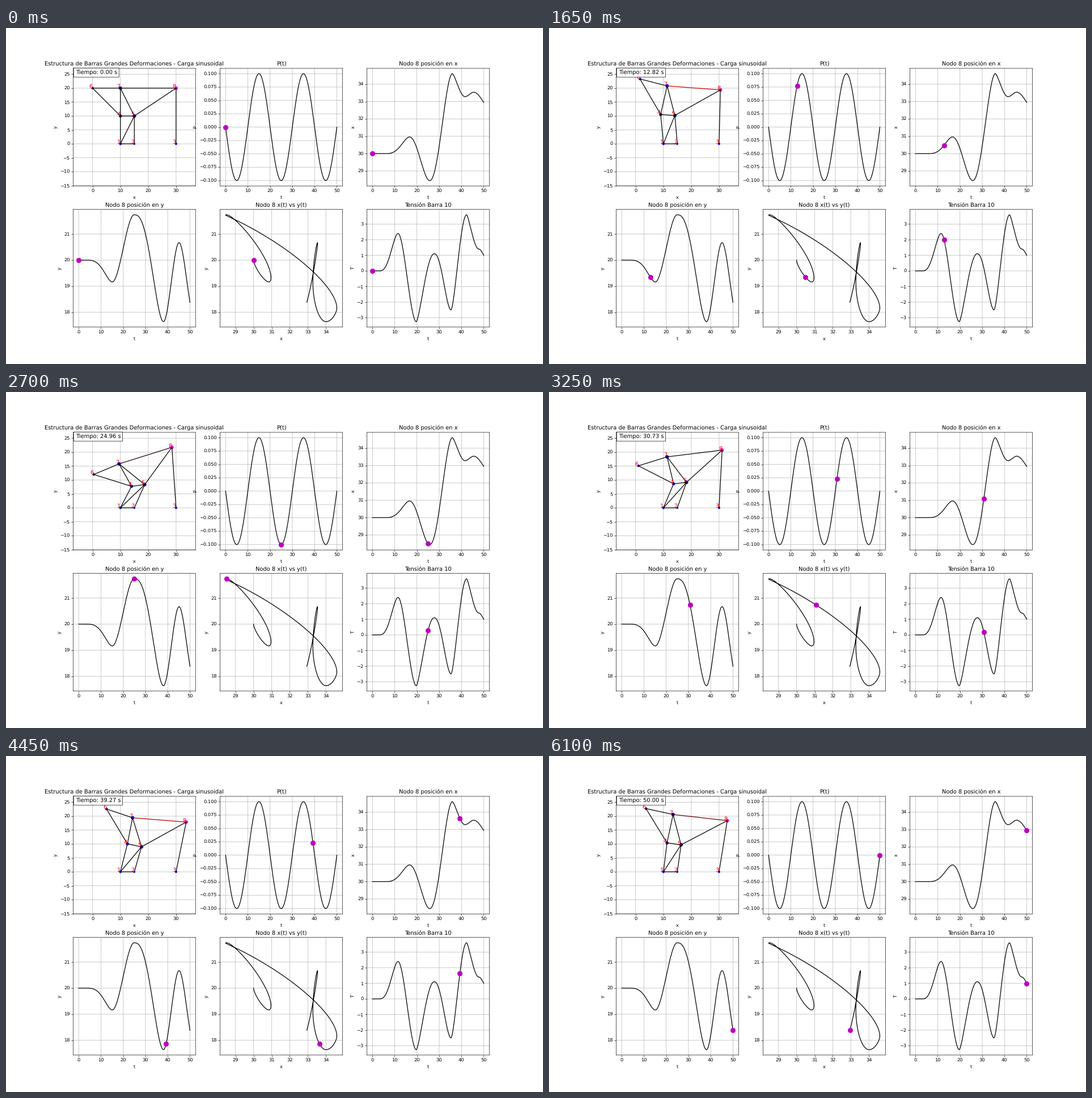
A matplotlib script for the animation above (6.15 s loop, 947x592 px).

```python
import numpy as np
import matplotlib.pyplot as plt
from matplotlib.animation import FuncAnimation

plt.rcParams.update({"text.hinting": "none", "path.snap": False})

DPI = 947 / 16
FRAMES, HOLD, STEP_MS = 123, 2, 50


def swing(*keys):
    """Ease between turning points (t, value[, lean]).

    lean > 1 delays the middle of the span that starts there, < 1 advances it.
    """
    t0, v, lean = np.array([(*k, 1)[:3] for k in keys], float).T

    def at(t):
        i = np.clip(np.searchsorted(t0, t, "right") - 1, 0, len(t0) - 2)
        s = np.clip((t - t0[i]) / (t0[i + 1] - t0[i]), 0, 1) ** lean[i]
        return v[i] + (v[i + 1] - v[i]) * s * s * (3 - 2 * s)
    return at


def clock(step):
    # The solver advances faster in the middle of the run
    return float(np.interp(step, [0, 13, 31, 52, 66, 73, 87, 107, 120],
                           [0, 3, 12.82, 24.96, 32.3, 35.04, 39.27, 45.76, 50]))


def load(t):
    return -0.1 * np.sin(2 * np.pi * t / 20)


x8 = swing((5, 30, 1.76), (16.6, 30.96, 1.1), (25.7, 28.45, 1.12),
           (35.9, 34.606, 0.8), (41.6, 33.28), (45.5, 33.54), (55, 32.25))
y8 = swing((3, 20, 1.78), (15.1, 19.163), (24.9, 21.737, 1.38),
           (38.1, 17.641), (45.1, 20.67), (52, 17.8))
tension = swing((3, 0, 1.45), (11.5, 2.4), (19.7, -3.255, 0.78),
                (27.7, 1.1, 1.2), (35.3, -2.5, 0.84), (42.3, 3.596, 0.77),
                (47.8, 1.4), (52, 0.65))

x4 = swing((3, 10), (13.3, 9), (26.3, 14.15), (38.5, 12.5), (44, 12.85), (52, 11))
y4 = swing((4, 10), (13, 10.55), (26.3, 7.65), (36, 9.9), (46, 10.4))
x5 = swing((4, 15), (13, 14.1), (26.5, 18.9), (36, 17.4), (44, 17.9), (54, 15.5))
y5 = swing((4, 10), (13, 10.2), (26.3, 8.28), (34.5, 9.82), (39.5, 8.98), (47, 9.7))
y7 = swing((3, 20), (12.8, 20.8), (26, 15.7), (35, 20.55), (40, 19.35), (46, 20.6))
angle6 = swing((2, 135), (12.5, 120, 0.85), (25.8, 163), (42, 117.5), (52, 122))

BARS = [(1, 2), (1, 4), (1, 5), (2, 5), (4, 5), (4, 6), (4, 7), (5, 7), (6, 7),
        (7, 8), (5, 8), (3, 8)]
LOADED = BARS.index((7, 8))
STIFFNESS, FULL_COLOR = 2.5, 2.4


def nodes(t):
    force = tension(t)
    # Node 7 hangs on node 8 by a bar that shortens with the force
    x7 = x8(t) - np.sqrt((20 - force / STIFFNESS) ** 2 - (y8(t) - y7(t)) ** 2)
    # Node 6 swings about node 4 on a bar that lengthens with it
    arm, a = np.sqrt(200) + 0.3 * force, np.radians(angle6(t))
    p4 = np.array([x4(t), y4(t)])
    p6 = p4 + arm * np.array([np.cos(a), np.sin(a)])
    return np.array([(10, 0), (15, 0), (30, 0), p4, (x5(t), y5(t)), p6,
                     (x7, y7(t)), (x8(t), y8(t))], float)


def bar_color(force):
    level = min(abs(force) / FULL_COLOR, 1)
    return (level, 0, 0) if force > 0 else (0, level, 0)


def padded(lo, hi):
    pad = 0.05 * (hi - lo)
    return lo - pad, hi + pad


def same(t):
    return t


fig, axes = plt.subplots(2, 3, figsize=(947 / DPI, 592 / DPI), dpi=DPI)
axes = axes.ravel()

T_RANGE, X_RANGE, Y_RANGE = (0, 50), (28.45, 34.606), (17.641, 21.737)
ts = np.linspace(*T_RANGE, 1001)
plots = [
    ("P(t)", "t", "P", same, load, T_RANGE, (-0.1, 0.1)),
    ("Nodo 8 posición en x", "t", "x", same, x8, T_RANGE, X_RANGE),
    ("Nodo 8 posición en y", "t", "y", same, y8, T_RANGE, Y_RANGE),
    ("Nodo 8 x(t) vs y(t)", "x", "y", x8, y8, X_RANGE, Y_RANGE),
    ("Tensión Barra 10", "t", "T", same, tension, T_RANGE, (-3.255, 3.596)),
]
markers = []
for ax, (title, xlabel, ylabel, fx, fy, xr, yr) in zip(axes[1:], plots):
    ax.plot(fx(ts), fy(ts), "k-")
    dot, = ax.plot([], [], "mo", markersize=10)
    markers.append((dot, fx, fy))
    ax.set(title=title, xlabel=xlabel, ylabel=ylabel,
           xlim=padded(*xr), ylim=padded(*yr))
    ax.grid(True)

truss = axes[0]
truss.set(title="Estructura de Barras Grandes Deformaciones - Carga sinusoidal",
          xlabel="x", ylabel="y", xlim=(-7, 37), ylim=(-15.12, 27.12),
          xticks=range(0, 31, 10), yticks=range(-15, 26, 5))
truss.grid(True)

# Dot area grows with the mass lumped at each node
start = nodes(0.0)
mass = np.zeros(8)
for a, b in BARS:
    mass[[a - 1, b - 1]] += np.hypot(*(start[a - 1] - start[b - 1])) / 2
joints = truss.scatter(*start.T, s=1.6 * mass, c=["blue"] * 7 + ["magenta"],
                       zorder=1.6)
bars = [truss.plot([], [], "k-")[0] for _ in BARS]
labels = [truss.text(0, 0, str(i + 1), color="red", fontsize=12, ha="right")
          for i in range(8)]
timer = truss.text(0.02, 0.95, "", transform=truss.transAxes, fontsize=12,
                   bbox=dict(facecolor="white", alpha=0.8))


def update(i):
    t = clock(max(0, i - HOLD))
    pos = nodes(t)
    joints.set_offsets(pos)
    for line, (a, b) in zip(bars, BARS):
        line.set_data(*pos[[a - 1, b - 1]].T)
    bars[LOADED].set_color(bar_color(tension(t)))
    for label, p in zip(labels, pos):
        label.set_position(p)
    timer.set_text(f"Tiempo: {t:.2f} s")
    for dot, fx, fy in markers:
        dot.set_data([fx(t)], [fy(t)])
    return [joints, *bars, *labels, timer, *(m[0] for m in markers)]


anim = FuncAnimation(fig, update, frames=FRAMES, interval=STEP_MS, repeat=True,
                     repeat_delay=0)
plt.show()
```
